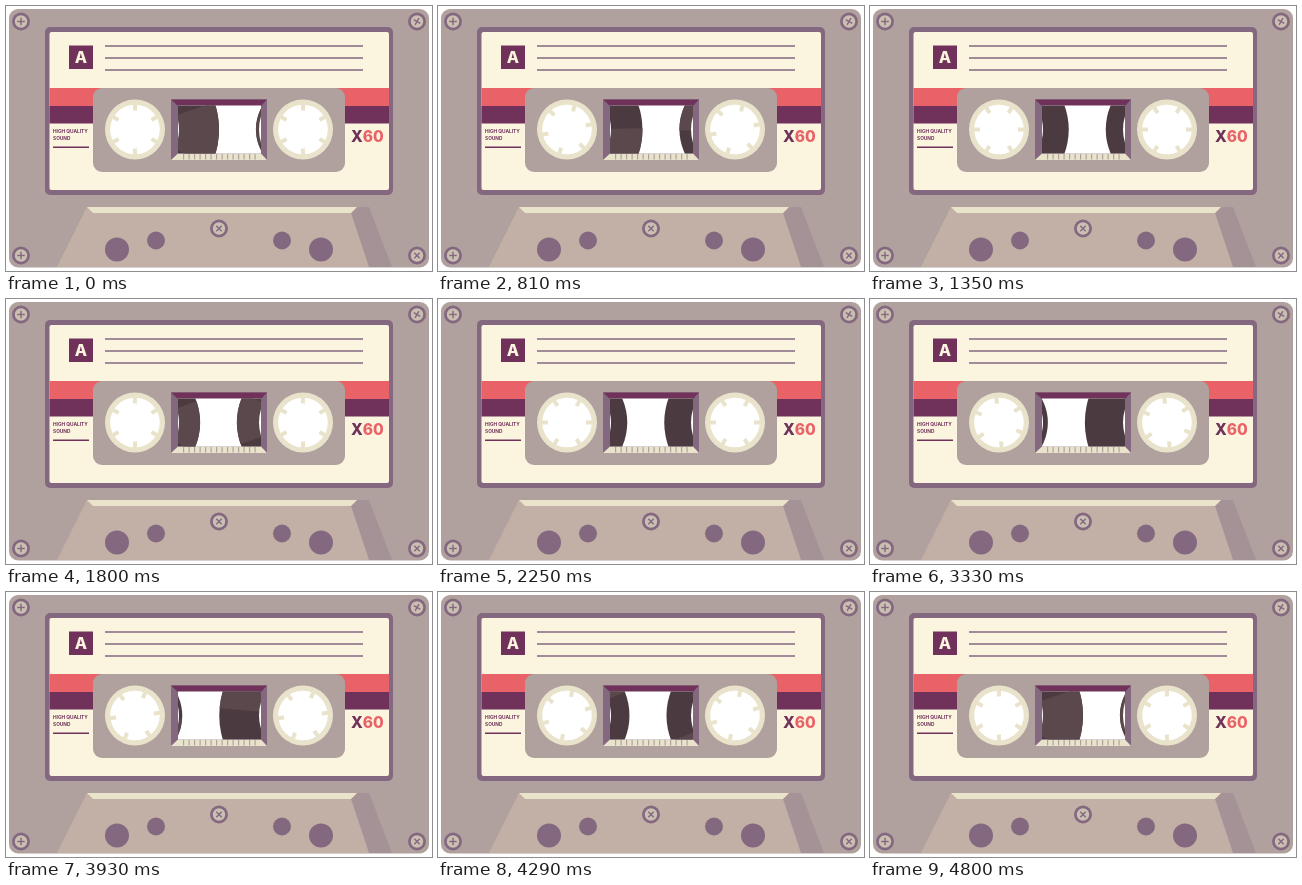
Animation, 426 px wide and 265 px high, one loop 5.1 s. Source, as an HTML page with a canvas:

```html
<!DOCTYPE html>
<html lang="en">
<head>
<meta charset="utf-8">
<title>Cassette</title>
<style>
  html, body { margin: 0; width: 100%; height: 100%; overflow: hidden; background: #fff; }
  canvas { display: block; width: 426px; height: 265px; }
</style>
</head>
<body>
<canvas id="stage"></canvas>
<script>
const W = 426, H = 265, LOOP = 5100, STEP = 30;
const PLAY_END = 3600, REWIND_START = 3900, REWIND_END = 4800;
const C = {
  body: '#b1a19e', purple: '#846880', plum: '#70325a', red: '#e96268',
  paper: '#fbf5df', cream: '#e9e3cc', face: '#c2b0a7', shade: '#a59296',
  tape: '#4b3a3f', shine: '#5b484c', white: '#fff'
};
const REELS = [{ x: 129, full: 84, travel: -38 }, { x: 297, full: 47, travel: 38 }];
const REEL_Y = 123.5, HUB_R = 44, TAU = Math.PI * 2, DEG = Math.PI / 180;

const canvas = document.getElementById('stage');
const ctx = canvas.getContext('2d');
const ratio = window.devicePixelRatio || 1;
canvas.width = W * ratio;
canvas.height = H * ratio;
ctx.scale(ratio, ratio);

function rect(x, y, w, h, color, radius = 0) {
  ctx.fillStyle = color;
  ctx.beginPath();
  ctx.roundRect(x, y, w, h, radius);
  ctx.fill();
}

function disc(x, y, r, color) {
  ctx.fillStyle = color;
  ctx.beginPath();
  ctx.arc(x, y, r, 0, TAU);
  ctx.fill();
}

function poly(color, ...points) {
  ctx.fillStyle = color;
  ctx.beginPath();
  points.forEach(([x, y]) => ctx.lineTo(x, y));
  ctx.closePath();
  ctx.fill();
}

function text(str, x, y, size, color, weight = 800, align = 'left') {
  ctx.font = `${weight} ${size}px Inter, sans-serif`;
  ctx.textAlign = align;
  ctx.fillStyle = color;
  ctx.fillText(str, x, y);
  return ctx.measureText(str).width;
}

function screw(x, y, angle) {
  disc(x, y, 9, C.purple);
  disc(x, y, 6.2, '#cbbfb2');
  ctx.save();
  ctx.translate(x, y);
  ctx.rotate(angle * DEG);
  rect(-3.8, -0.7, 7.6, 1.4, C.purple);
  rect(-0.7, -3.8, 1.4, 7.6, C.purple);
  ctx.restore();
}

function drawLabel() {
  rect(39, 21, 348, 168, C.purple, 5);
  rect(43.5, 26, 339.5, 158, C.paper, 2);
  rect(43.5, 82, 339.5, 18, C.red);
  rect(43.5, 100, 339.5, 17.5, C.plum);
  rect(63, 39.5, 24, 23.5, C.plum);
  text('A', 75, 57, 16, C.paper, 800, 'center');
  for (const y of [39.2, 51.2, 63.2]) rect(99, y, 258, 1.6, C.purple);
  text('HIGH QUALITY', 47, 127.3, 4.8, C.plum, 700);
  text('SOUND', 47, 134, 4.8, C.plum, 700);
  rect(47, 140.6, 36, 1.4, C.plum);
  const width = text('X', 345, 136, 15.5, C.plum);
  text('60', 345 + width, 136, 15.5, C.red);
  rect(87, 82, 252, 84, C.body, 9);
}

function drawBase() {
  poly(C.face, [81, 201], [351, 201], [363, 261], [51, 261]);
  poly(C.shade, [351, 201], [363, 201], [386, 261], [363, 261], [345, 207]);
  poly(C.cream, [81, 201], [351, 201], [345, 207], [87, 207]);
  for (const side of [-1, 1]) {
    disc(213 + side * 102, 243.5, 12, C.purple);
    disc(213 + side * 63, 234.5, 9, C.purple);
  }
}

function drawTape(reel, progress, angle) {
  const r = reel.full + reel.travel * progress;
  disc(reel.x, REEL_Y, r, C.tape);
  ctx.fillStyle = C.shine;
  for (const start of [-19, 161]) {
    ctx.beginPath();
    ctx.moveTo(reel.x, REEL_Y);
    ctx.arc(reel.x, REEL_Y, r, (start + angle) * DEG, (start + 45 + angle) * DEG);
    ctx.fill();
  }
  disc(reel.x, REEL_Y, HUB_R, C.white);
}

function drawWindow(progress, angle) {
  rect(165, 93.5, 96, 60.5, C.purple);
  poly(C.plum, [165, 93.5], [261, 93.5], [255, 100], [172, 100]);
  poly(C.cream, [165, 154], [172, 147.5], [255, 147.5], [261, 154]);
  for (let x = 177; x < 253; x += 5.5) rect(x, 148, 1.2, 5.5, C.body);
  ctx.save();
  ctx.beginPath();
  ctx.rect(172, 99.5, 83, 48);
  ctx.clip();
  rect(172, 99, 83, 49, C.white);
  for (const reel of REELS) drawTape(reel, progress, angle);
  ctx.restore();
}

function drawReel(reel, angle) {
  disc(reel.x, REEL_Y, 30, C.cream);
  disc(reel.x, REEL_Y, 24.8, C.white);
  ctx.save();
  ctx.translate(reel.x, REEL_Y);
  ctx.rotate(angle * DEG);
  for (let i = 0; i < 6; i++) {
    rect(-2, -25.5, 4, 6.5, C.cream);
    ctx.rotate(TAU / 6);
  }
  ctx.restore();
}

// 0 is fully rewound, 1 is played to the end.
function progressAt(t) {
  if (t < PLAY_END) return t / PLAY_END;
  if (t < REWIND_START) return 1;
  return Math.max(0, (REWIND_END - t) / (REWIND_END - REWIND_START));
}

function draw(t) {
  const progress = progressAt(t);
  const angle = -720 * progress;
  rect(0, 0, W, H, C.white);
  rect(3, 3, 420, 258.5, C.body, 9);
  drawLabel();
  drawBase();
  drawWindow(progress, angle);
  for (const reel of REELS) drawReel(reel, angle);
  screw(15, 15.5, 0);
  screw(411, 15.5, 30);
  screw(15, 249.5, 0);
  screw(411, 249.5, 45);
  screw(213, 222.5, 45);
}

const begin = performance.now();
function tick() {
  const t = (performance.now() - begin) % LOOP;
  draw(Math.floor(t / STEP) * STEP);
  requestAnimationFrame(tick);
}
tick();
</script>
</body>
</html>
```
